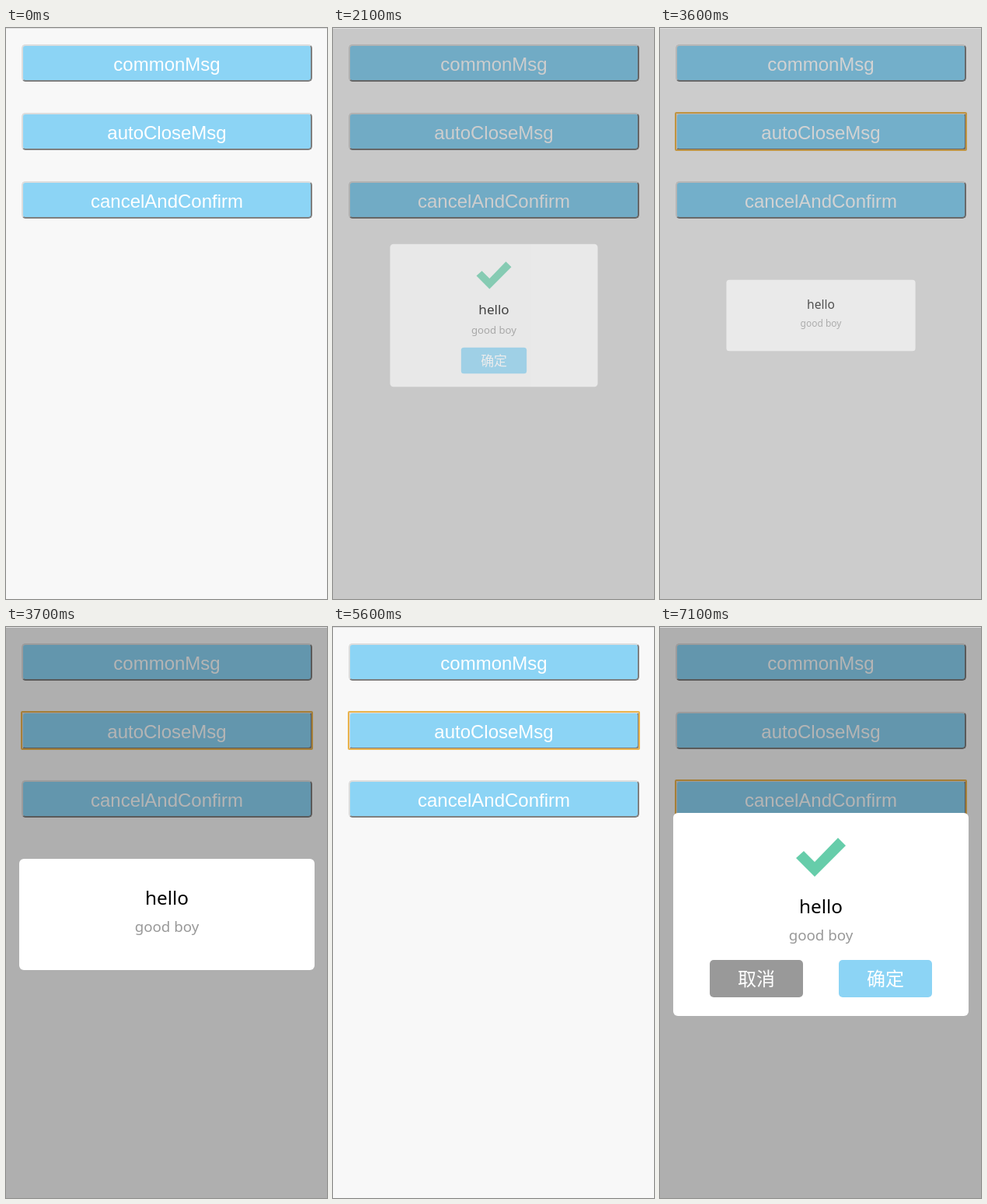
These frames come from a looping animation (413x734 px, 8000 ms). An HTML page:

```html
<!DOCTYPE html>
<html lang="zh">
<head>
<meta charset="utf-8">
<style>
html, body { margin: 0; width: 100%; height: 100%; overflow: hidden; background: #f8f8f8; }
.rule { position: absolute; top: 0; width: 100%; height: 1px; background: #dedede; }
.btn {
  position: absolute; left: 20px; width: 374px; height: 48px; box-sizing: border-box;
  border: 2px solid; border-color: #ddd #7f7f7f #7f7f7f #ddd; border-radius: 5px;
  background: #8cd4f5; color: #fff; text-align: center;
  font: 24px/48px "Liberation Sans", Arial, sans-serif;
}
.btn.down { border-color: #7f7f7f #ddd #ddd #7f7f7f; }
.btn.focus::after {
  content: ""; position: absolute; inset: -3px;
  border: 2px solid #e9b44f; border-radius: 2px;
}
svg { position: absolute; left: 0; top: 0; }
text { text-anchor: middle; font-family: "Noto Sans", "Open Sans", sans-serif; }
.title { font-size: 24.3px; }
.note { font-size: 18.75px; fill: #999; }
.label { font: 24px "Noto Sans CJK SC", "Noto Sans CJK", sans-serif; fill: #fff; }
</style>
</head>
<body>
<div class="rule"></div>
<div class="btn" style="top:21px">commonMsg</div>
<div class="btn" style="top:109px">autoCloseMsg</div>
<div class="btn" style="top:197px">cancelAndConfirm</div>
<svg width="413" height="734">
  <rect id="mask" y="1" width="413" height="733"/>
  <g id="dialog"></g>
</svg>
<script>
const LOOP = 8000, TICK = 100;
const buttons = document.querySelectorAll('.btn');
const mask = document.getElementById('mask');
const dialog = document.getElementById('dialog');

const card = (y, h, fill) => `<rect x="17" y="${y}" width="380" height="${h}" rx="6" fill="${fill}"/>`;
const message = y => `<text class="title" x="207" y="${y}">hello</text>
  <text class="note" x="207" y="${y + 35}">good boy</text>`;
const check = '<path d="M175 297l10-9 14 14 30-31 10 10-40 40z" fill="#66cdaa"/>';
const action = (x, fill, label) => `<rect x="${x}" y="428" width="120" height="48" rx="5" fill="${fill}"/>
  <text class="label" x="${x + 60}" y="461">${label}</text>`;

// enter / leave: visibility level at each tick
const rise = [.11, .44, .78, 1];
const scenes = [
  { open: 500, close: 2100, blur: 2100, enter: rise, leave: [.67, .33, 0], press: true,
    body: card(239, 261, '#f9f9f9') + check + message(368) + action(147, '#8cd4f5', '确定') },
  { open: 3600, close: 5400, blur: 6800, enter: [.6, 1], leave: [.54, .2, 0],
    body: card(298, 143, '#fff') + message(357) },
  { open: 6800, close: LOOP, blur: LOOP, enter: rise, leave: [0], press: true,
    body: card(239, 261, '#fff') + check + message(368)
      + action(64, '#999', '取消') + action(230, '#8cd4f5', '确定') }
];

const levelAt = (levels, ms) => levels[Math.min(levels.length - 1, Math.floor(ms / TICK))];
let shown = null;

function draw(t) {
  const scene = scenes.findLast(s => t >= s.open);
  const level = !scene ? 0 : t < scene.close
    ? levelAt(scene.enter, t - scene.open)
    : levelAt(scene.leave, t - scene.close);
  if (scene && scene !== shown) dialog.innerHTML = scene.body;
  shown = scene;
  mask.setAttribute('opacity', .295 * level);
  dialog.setAttribute('opacity', level);
  dialog.setAttribute('transform',
    `translate(207 369.5) scale(${.1 + .9 * level}) translate(-207 -369.5)`);
  buttons.forEach((b, i) => {
    const s = scenes[i];
    b.classList.toggle('focus', t >= s.open && t < s.blur);
    b.classList.toggle('down', !!s.press && t >= s.open && t < s.open + TICK);
  });
}

const start = performance.now();
function frame() {
  draw((performance.now() - start) % LOOP);
  requestAnimationFrame(frame);
}
frame();
</script>
</body>
</html>
```
